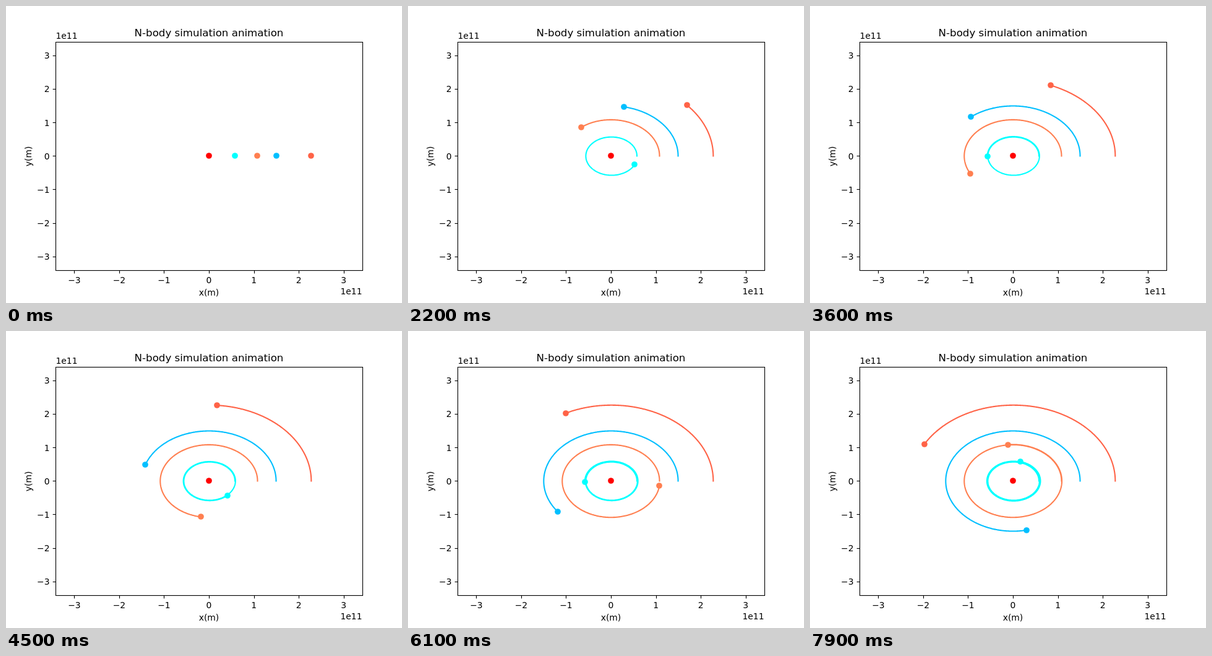
Recreate the animation shown at these times as an HTML page with a canvas. Size 640x480 px, loop 8 s.

```html
<!DOCTYPE html>
<html lang="en">
<head>
<meta charset="utf-8">
<title>N-body simulation animation</title>
<style>
  html, body { margin: 0; width: 100%; height: 100%; overflow: hidden; background: #fff; }
  canvas { display: block; }
</style>
</head>
<body>
<canvas id="stage" width="640" height="480"></canvas>
<script>
const ctx = document.getElementById('stage').getContext('2d');
const FRAMES = 80, FRAME_MS = 100;
const LEFT = 80, RIGHT = 576, TOP = 57.6, BOTTOM = 427.2;
const LIMIT = 3.4185e11;              // half the width of both axes, in metres
const MU = 6.674e-11 * 1.989e30;      // gravity of the central star
const DT = 1800, STEPS = 174, SAMPLE = 29;
const PER_FRAME = STEPS / SAMPLE;

const toX = x => 328 + x / LIMIT * (RIGHT - LEFT) / 2;
const toY = y => 242.4 - y / LIMIT * (BOTTOM - TOP) / 2;

// Plain Euler steps, so the orbits slowly spiral outwards
function orbit(radius, speed, color) {
  let x = radius, y = 0, vx = 0, vy = speed;
  const points = [];
  for (let i = 0; i <= STEPS * (FRAMES - 1); i++) {
    if (i % SAMPLE === 0) points.push([toX(x), toY(y)]);
    const pull = -MU / Math.hypot(x, y) ** 3 * DT;
    const ax = pull * x, ay = pull * y;
    x += vx * DT;
    y += vy * DT;
    vx += ax;
    vy += ay;
  }
  return { points, color };
}

const planets = [
  orbit(5.79e10, 47360, '#00ffff'),
  orbit(1.082e11, 35020, '#ff7f50'),
  orbit(1.496e11, 29780, '#00bfff'),
  orbit(2.279e11, 24070, '#ff6347')
];

function text(str, x, y, align = 'center', size = 13.89) {
  ctx.font = `${size}px "DejaVu Sans", sans-serif`;
  ctx.textAlign = align;
  ctx.fillText(str, x, y);
}

function line(x1, y1, x2, y2) {
  ctx.beginPath();
  ctx.moveTo(x1, y1);
  ctx.lineTo(x2, y2);
  ctx.stroke();
}

function drawAxes() {
  ctx.fillStyle = ctx.strokeStyle = '#000';
  ctx.lineWidth = 1.11;
  ctx.lineCap = 'butt';
  ctx.lineJoin = 'miter';
  ctx.strokeRect(80.5, 58.5, 496, 369);
  for (let n = -3; n <= 3; n++) {
    const label = n < 0 ? '\u2212' + -n : String(n);
    const x = toX(n * 1e11), y = toY(n * 1e11);
    const px = Math.round(x) + 0.5, py = Math.round(y) + 0.5;
    line(px, 427.5, px, 432.36);
    line(80.5, py, 75.64, py);
    text(label, x, 448);
    text(label, 70.5, Math.round(y + 5.2), 'right');
  }
  text('N-body simulation animation', 328, 49, 'center', 16.67);
  text('1e11', 80.5, 53, 'left');
  text('1e11', 575.5, 466, 'right');
  text('x(m)', 328, 468);
  ctx.save();
  ctx.translate(41, 242.9);
  ctx.rotate(-Math.PI / 2);
  text('y(m)', 0, 0);
  ctx.restore();
}

function drawDot([x, y], color) {
  ctx.fillStyle = color;
  ctx.beginPath();
  ctx.arc(Math.round(x), Math.round(y), 4.86, 0, Math.PI * 2);
  ctx.fill();
}

function drawTrail(points, color) {
  ctx.strokeStyle = color;
  ctx.lineWidth = 2.083;
  ctx.lineCap = 'square';
  ctx.lineJoin = 'round';
  ctx.beginPath();
  points.forEach(([x, y]) => ctx.lineTo(x, y));
  ctx.stroke();
}

function draw(frame) {
  ctx.fillStyle = '#fff';
  ctx.fillRect(0, 0, 640, 480);
  const last = frame * PER_FRAME;
  for (const { points, color } of planets) {
    if (frame) drawTrail(points.slice(0, last + 1), color);
    drawDot(points[last], color);
  }
  drawDot([328, 242.4], '#ff0000');
  drawAxes();
}

let start, shown = -1;
function tick(now) {
  start ??= now;
  const frame = Math.floor((now - start) / FRAME_MS) % FRAMES;
  if (frame !== shown) draw(shown = frame);
  requestAnimationFrame(tick);
}
requestAnimationFrame(tick);
</script>
</body>
</html>
```
